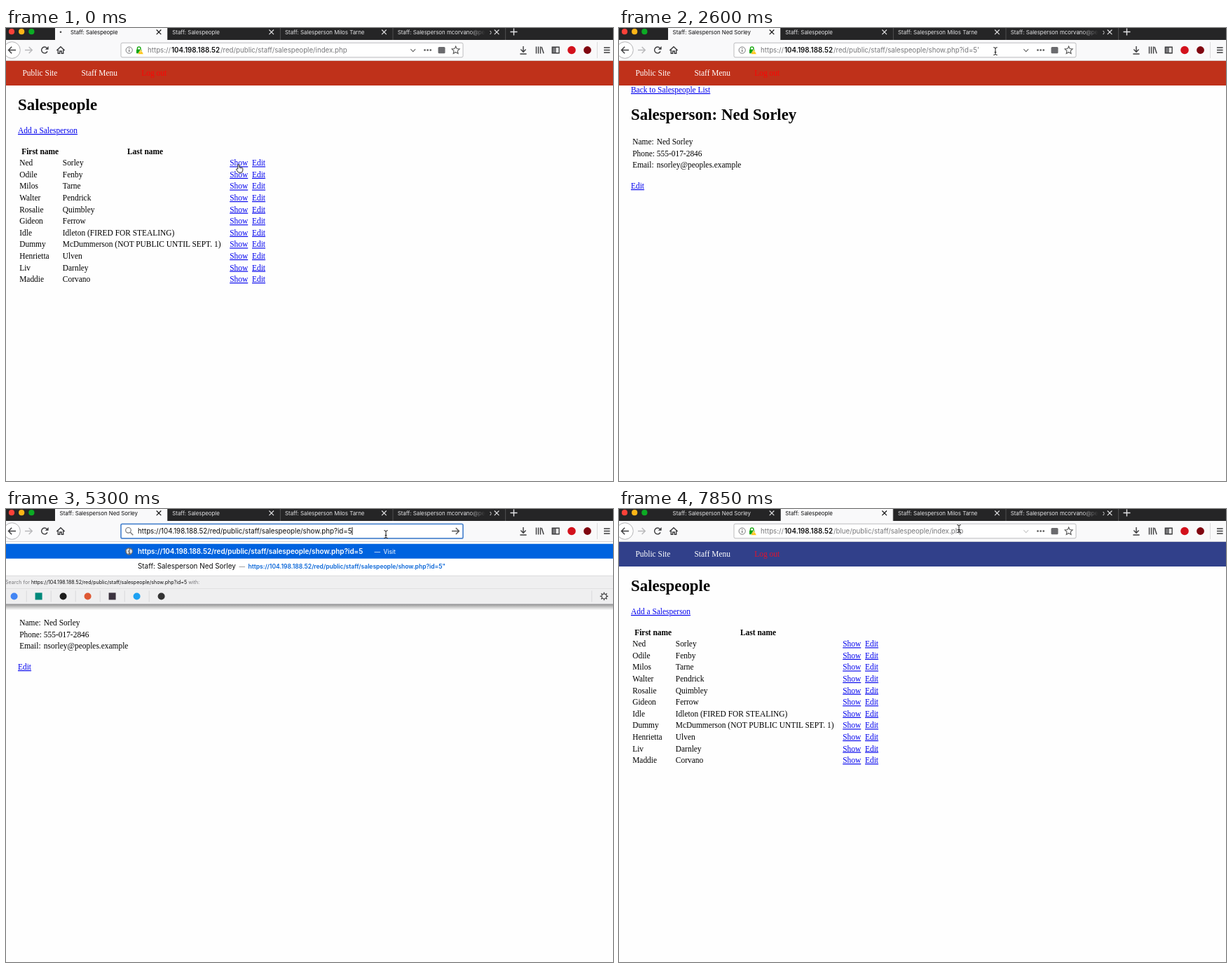
An HTML page for the animation above (8 s loop, 866 by 646 pixels).

```html
<!DOCTYPE html>
<html lang="en">
<head>
<meta charset="utf-8">
<title>Staff: Salespeople</title>
<style>
html, body { margin: 0; width: 100%; height: 100%; overflow: hidden; background: #fff; }
svg { display: block; width: 100%; height: 100%; }
text { white-space: pre; }
.ui { font-family: Inter, "Open Sans", sans-serif; }
.page { font-family: "Liberation Serif", "Noto Serif", serif; font-size: 11.43px; }
.link { fill: #0000ee; text-decoration: underline; }
.b { font-weight: 700; }
.sb { font-weight: 600; }
.line { fill: none; stroke: #3c3c3e; stroke-width: 1.4; }
</style>
</head>
<body>
<svg id="stage" viewBox="0 0 866 646" preserveAspectRatio="none"></svg>
<script>
const stage = document.getElementById('stage');
const LOOP = 8000;
const HOST = '104.198.188.52';
const PERSON = 'Ned Sorley';
const PEOPLE = [
  ['Ned', 'Sorley'], ['Odile', 'Fenby'], ['Milos', 'Tarne'], ['Walter', 'Pendrick'],
  ['Rosalie', 'Quimbley'], ['Gideon', 'Ferrow'], ['Idle', 'Idleton (FIRED FOR STEALING)'],
  ['Dummy', 'McDummerson (NOT PUBLIC UNTIL SEPT. 1)'], ['Henrietta', 'Ulven'],
  ['Liv', 'Darnley'], ['Maddie', 'Corvano']
];
// pointer path: time, x, y
const PATH = [
  [0, 333, 200], [300, 334, 198], [450, 345, 180], [800, 500, 48], [950, 522, 33],
  [1250, 534, 32], [1550, 539, 32], [1700, 537, 33], [2750, 537, 33], [3050, 530, 60],
  [3350, 508, 112], [3500, 508, 112], [3950, 537, 37], [4100, 535, 36], [4400, 541, 35],
  [4850, 544, 35], [5000, 542, 36], [6200, 542, 36], [6650, 299, 22], [6800, 298, 9],
  [7250, 298, 9], [7550, 400, 20], [7850, 485, 28], [LOOP, 485, 28]
];

const within = (t, ...spans) => spans.some(([a, b]) => t >= a && t < b);
const text = (x, y, s, size, fill = '#0c0c0d', more = '') =>
  `<text x="${x}" y="${y}"${size ? ` font-size="${size}"` : ''} fill="${fill}" ${more}>${s}</text>`;
const rect = (x, y, w, h, fill, more = '') =>
  `<rect x="${x}" y="${y}" width="${w}" height="${h}" fill="${fill}" ${more}/>`;
const disc = (x, y, r, fill, more = '') => `<circle cx="${x}" cy="${y}" r="${r}" fill="${fill}" ${more}/>`;
const line = (d, more = '') => `<path class="line" d="${d}" ${more}/>`;
const range = (n, f) => Array.from({ length: n }, (_, i) => f(i)).join('');
const ink = c => `style="stroke:${c}"`;

function stateAt(t) {
  const blue = t >= 6800, list = t < 450 || blue;
  const id = t < 2000 ? '5' : t < 5300 ? "5'" : t < 5450 ? '5' : '5"';
  return {
    blue, list, t,
    busy: within(t, [0, 450], [2450, 2600], [5900, 6050]),
    path: `/${blue ? 'blue' : 'red'}/public/staff/salespeople/${list ? 'index.php' : 'show.php?id=' + id}`,
    focus: within(t, [1100, 2450], [4400, 5900]),
    selected: within(t, [1100, 1550], [4400, 4850]),
    typed: within(t, [2000, 2450], [5300, 5900]),
    reloadOff: within(t, [450, 1100], [3500, 5300], [6050, 6350]),
    rows: t < 3000 ? 10 : t < 5450 ? 2 : 4
  };
}

function tabs(s) {
  const active = s.blue ? 1 : 0, step = 160.7;
  const own = s.list && !s.blue ? 'Staff: Salespeople' : 'Staff: Salesperson ' + PERSON;
  const titles = [own, 'Staff: Salespeople', 'Staff: Salesperson Milos Tarne', 'Staff: Salesperson mcorvano@peop'];
  const lights = ['#fc4138', '#fdb517', '#0cab24'];
  let out = rect(0, 0, 866, 17, '#252526') + rect(70 + active * step, 0, step - .5, 17, '#f9f9fa');
  out += lights.map((c, i) => disc(8 + i * 14.2, 5.2, 4.1, c)).join('');
  titles.forEach((title, i) => {
    const x = 70 + i * step, on = i === active, fill = on ? '#0c0c0d' : '#e4e4e6';
    const busy = i === 0 && s.busy;
    out += text(x + (busy ? 22 : 6.6), 9, title, 7.86, fill);
    if (busy) out += disc(78, 5.8, 1.3, '#444');
    if (i === 3) out += rect(x + 108, 0, 30, 16, 'url(#fade)');
    out += line(`M${x + 144.7} 2.5l6.6 6.6m0-6.6l-6.6 6.6`, `style="stroke:${fill};stroke-width:1.1"`);
    out += rect(x + step - .5, 0, .8, 17, '#59595b');
  });
  return out + line('M724.5 .5v10m-5-5h10', ink('#e4e4e6'));
}

function star(cx, cy) {
  const pts = Array.from({ length: 10 }, (_, i) => {
    const a = -Math.PI / 2 + i * Math.PI / 5, r = i % 2 ? 2.7 : 5.8;
    return (cx + r * Math.cos(a)).toFixed(1) + ' ' + (cy + r * Math.sin(a)).toFixed(1);
  });
  return line('M' + pts.join('L') + 'z', 'style="stroke-width:1.1;stroke:#555"');
}

function toolbar(s) {
  let out = rect(0, 17, 866, 29.5, '#f9f9fa') + rect(0, 46, 866, .6, '#c9c9cb');
  out += disc(8.5, 31.5, 11.8, '#fff', 'stroke="#b4b4b6" stroke-width="1"');
  out += line('M14 31.5H3.5m4.7-4.7l-4.7 4.7l4.7 4.7');
  out += line('M27 31.5h10.3m-4.6-4.6l4.6 4.6l-4.6 4.6', ink('#b9b9bb'));
  const c = s.reloadOff ? '#b9b9bb' : '#3c3c3e';
  out += line('M59 33.4a4.4 4.4 0 1 1-.8-5', ink(c)) + `<path d="M60.6 26v4.8h-4.8z" fill="${c}"/>`;
  out += line('M72.3 32l5.7-5.3l5.7 5.3M74.3 31v5.3h2.4v-3.3h2.6v3.3h2.4v-5.3');
  out += line('M738 26v8m-3.6-3.4l3.6 3.6l3.6-3.6M733.4 37h9.2');
  out += line('M756.5 26.5v10m3-10v10m3-10v10m1.6-9.6l3 9.4');
  out += line('M779.3 27.3h9.8v8.4h-9.8zM784 27.3v8.4') + rect(780, 28, 3.6, 7, '#77777a');
  out += disc(807, 31.5, 5.8, '#d3111c') + disc(829.5, 31.5, 5.4, '#800610');
  out += rect(843, 20, .8, 23, '#d4d4d6') + line('M853 28h8.6m-8.6 3.5h8.6m-8.6 3.5h8.6');
  return out + urlBar(s);
}

function urlBar(s) {
  let out = s.focus
    ? rect(164, 21.3, 488, 20.6, '#fff', 'rx="2" stroke="#4f87cf" stroke-width="1.7"')
    : rect(164, 21.2, 488, 20.6, '#fff', 'rx="2" stroke="#bcbcbe" stroke-width="1"');
  const full = 'https://' + HOST + s.path;
  if (s.typed) {
    out += disc(174.5, 30.3, 3.8, 'none', 'stroke="#77777a" stroke-width="1.2"');
    out += line('M177.3 33.2l4 4', ink('#77777a'));
    out += line('M636 31.5h10.4m-4.6-4.6l4.6 4.6l-4.6 4.6', ink('#555'));
    return out + text(188, 35, full, 9.76, '#0c0c0d', 'id="field"');
  }
  out += disc(175.7, 31.6, 4.6, 'none', 'stroke="#77777a" stroke-width="1"');
  out += rect(175.1, 31, 1.2, 3, '#666') + rect(175.1, 28.8, 1.2, 1.2, '#666');
  out += rect(186, 30.5, 7.5, 5.8, '#12a50c', 'rx=".8"');
  out += line('M187.4 31v-1.8a2.3 2.3 0 0 1 4.6 0v1.8', ink('#12a50c'));
  out += '<path d="M192.2 30.6l4 6.6h-8z" fill="#ffbf00" stroke="#fff" stroke-width=".5"/>' +
    rect(191.8, 32.8, .8, 2.4, '#fff');
  const chevron = s.blue ? (s.t < 7700 ? 0 : .35) : 1;
  out += line('M577.3 30.2l3.4 3.4l3.4-3.4', `opacity="${chevron}" style="stroke:#666;stroke-width:1.1"`);
  out += range(3, i => disc(597.5 + i * 4.1, 31.5, 1.35, '#555'));
  out += rect(616.5, 27, 10, 9.2, '#6a6a6d', 'rx="1.5"') + star(641.6, 31.8);
  if (s.focus) {
    if (s.selected) out += rect(202, 25, 314, 13, '#b3d6fd');
    return out + text(202, 35, full, 9.76, '#0c0c0d', 'id="field"');
  }
  return out + text(202, 35, 'https://', 9.76, '#77777a') +
    text(236, 35, HOST, 9.76, '#0c0c0d', 'class="sb"') + text(306, 35, s.path, 9.7, '#77777a');
}

const link = (x, y, s) => text(x, y, s, 0, '#0000ee', 'class="link"');

function page(s) {
  let out = rect(0, 46.5, 866, 35.5, s.blue ? '#31408a' : '#bf311a');
  out += text(23.5, 68, 'Public Site', 0, '#fff') + text(107.5, 68, 'Staff Menu', 0, '#fff') +
    text(193.3, 68, 'Log out', 0, s.blue ? '#e5102c' : '#fb0606');
  if (!s.list) {
    const rows = [['Name:', PERSON], ['Phone:', '555-017-2846'], ['Email:', 'nsorley@peoples.example']];
    out += link(17, 92, 'Back to Salespeople List');
    out += text(17, 131, 'Salesperson: ' + PERSON, 22.86, '#000', 'class="b"');
    rows.forEach(([k, v], i) => {
      const y = 166 + i * 16.7;
      out += text(19.2, y, k, 0, '#000') + text(53.8, y, v, 0, '#000');
    });
    return out + link(17, 229, 'Edit');
  }
  out += text(17, 117, 'Salespeople', 22.86, '#000', 'class="b"') + link(17, 150, 'Add a Salesperson');
  out += text(22.2, 179.7, 'First name', 0, '#000', 'class="b"') +
    text(173, 179.7, 'Last name', 0, '#000', 'class="b"');
  PEOPLE.forEach(([first, last], i) => {
    const y = 196.3 + i * 16.58;
    out += text(19.2, y, first, 0, '#000') + text(80.8, y, last, 0, '#000') +
      link(319.2, y, 'Show') + link(351, y, 'Edit');
  });
  return out;
}

function globe(y) {
  return disc(175.6, y, 5.4, '#6c6c6f') +
    `<path d="M171.6 ${y - 2}l3-2l1.5 1.4l-2 2.6l1.4 1.6l-1.4 2.6l-2-2zM177 ${y - 3}l2.6 1l.4 3l-2 2.6l-1.6-3z" fill="#dededf"/>`;
}

// one suggestion line: title, dash, address
function hit(y, title, dash, url, more = '', fill = '#0a66d8') {
  return text(188, y + 3.5, title, 9.88) + text(dash, y + 3.3, '—', 8.57, '#77777a') +
    text(dash + 13, y + 3.2, url, 8.53, fill, more);
}

function popup(s) {
  const url = 'https://' + HOST + s.path;
  const base = `https://${HOST}/blue/public/staff/salespeople/show.php?id=5`;
  const rowY = i => 60.5 + i * 21.43;
  const end = 52 + s.rows * 21.43, who = 'Staff: Salesperson ' + PERSON;
  const q = s.rows === 10 ? "'" : '"';
  const own = s.rows === 2 ? url + '"' : url;
  let out = rect(0, 46.5, 866, end - 5.5, '#fff') + rect(0, 46, 866, .6, '#c9c9cb');
  out += rect(0, 49.7, 866, 21, '#0063df') + globe(60.3);
  out += text(188, 64, url, 9.88, '#fff', 'class="sb"');
  const dash = s.path.endsWith('5') ? 525.5 : 528.3;
  out += text(dash, 63.8, '—', 8.57, '#fff') + text(dash + 13, 63.8, 'Visit', 8.57, '#fff');
  for (let i = 1; i < s.rows; i++) {
    const y = rowY(i);
    if (s.rows > 2) out += globe(y);
    if (i === 1) out += hit(y, who, 332.5, own, 'class="sb"');
    else if (i === 2 && s.rows === 10) {
      out += rect(156.5, y - 3.8, 7.6, 5.6, '#9a9a9d', 'rx=".8"') + rect(154.8, y + 2, 11, 1.6, '#9a9a9d');
      out += hit(y, 'Staff: Salesperson Milos Tarne', 339.5, 'Switch to Tab', '', '#00847a');
    } else if (i === 3 || i === 7)
      out += hit(y, HOST, 263.5, `${base}${q} or ${q}1${q}=${q}1${q}; ${i === 3 ? '#' : '--'}`);
    else out += hit(y, who, 332.5, `${base}${q} or ${q}1...`);
  }
  out += rect(0, end, 866, 41, '#efeff0') + rect(0, end, 866, .7, '#d0d0d2') + rect(0, end + 18.3, 866, .7, '#dadadc');
  out += text(-1, end + 12, `Search for <tspan fill="#0c0c0d" class="m">${url}</tspan> with:`, 7.1, '#77777a');
  const iy = end + 29.6;
  const marks = ['#4285f4', '#00897b', '#1c1c1c', '#de5833', '#3b3340', '#1da1f2', '#333333'];
  marks.forEach((c, i) => {
    const x = 11.6 + i * 35;
    out += i % 3 === 1 ? rect(x - 5, iy - 5, 10, 10, c) : disc(x, iy, 5, c);
    if (i < 6) out += rect(x + 17.2, iy - 8, .7, 16, '#d0d0d2');
  });
  out += rect(835.5, iy - 8, .7, 16, '#d0d0d2');
  out += disc(853.3, iy, 3.4, 'none', 'stroke="#555" stroke-width="1.2"');
  out += range(8, i => `<path class="line" d="M857 ${iy}h2" transform="rotate(${i * 45} 853.3 ${iy})"/>`);
  return out + rect(0, end + 40.6, 866, .9, '#8a8a8c') + rect(0, end + 41.4, 866, 8, 'url(#shade)');
}

function pointer(t) {
  const i = PATH.findIndex(p => p[0] > t);
  const [t0, x0, y0] = PATH[i - 1], [t1, x1, y1] = PATH[i];
  const k = (t - t0) / (t1 - t0), x = x0 + (x1 - x0) * k, y = y0 + (y1 - y0) * k;
  let shape;
  if (t < 450)
    shape = '<path d="M-2.2 1v-5.2q0-1.3 1-1.3t1 1.3v2.7l4 .7q1 .3 1 1.5v2.4l-1.3 3h-4.8l-3-4q-.4-1.3.8-1.2z" fill="#fff" stroke="#111" stroke-width=".9"/>' +
      line('M.8-1v2m1.7-1.7v2', 'style="stroke-width:.5"');
  else if (y > 19 && y < 43)
    shape = line('M-2.7-5.3q2.2 0 2.7 1.2q.5-1.2 2.7-1.2M0-4.2v8.6M-2.7 5.5q2.2 0 2.7-1.2q.5 1.2 2.7 1.2M-1.3 1.5h2.6', 'style="stroke:#111;stroke-width:1"');
  else
    shape = '<path d="M0-5v11l2.6-2.4l1.7 3.9l1.8-.8l-1.7-3.7h3.5z" fill="#111" stroke="#fff" stroke-width=".8"/>';
  return `<g transform="translate(${x.toFixed(1)} ${y.toFixed(1)})">${shape}</g>`;
}

const DEFS = `<defs>
  <linearGradient id="fade"><stop stop-color="#252526" stop-opacity="0"/><stop offset=".8" stop-color="#252526"/></linearGradient>
  <linearGradient id="shade" x2="0" y2="1"><stop stop-opacity=".38"/><stop offset="1" stop-opacity="0"/></linearGradient>
</defs>`;

function draw(t) {
  const s = stateAt(t);
  stage.innerHTML = DEFS + rect(0, 0, 866, 646, '#fefefe') +
    `<g class="page">${page(s)}</g><g class="ui">${tabs(s)}${toolbar(s)}${s.typed ? popup(s) : ''}</g>` +
    '<rect id="caret" y="26" width=".9" height="11" visibility="hidden"/>' + pointer(t);
  const field = document.getElementById('field');
  if (field && !s.selected) {
    const caret = document.getElementById('caret');
    caret.setAttribute('x', +field.getAttribute('x') + field.getComputedTextLength());
    caret.setAttribute('visibility', 'visible');
  }
}

const stepTime = t => t < 650 ? Math.min(450, Math.floor(t / 150) * 150) : Math.floor((t - 50) / 150) * 150 + 50;

const start = performance.now();
let shown = -1;
function tick(now) {
  const t = stepTime(Math.max(0, now - start) % LOOP);
  if (t !== shown) draw(shown = t);
  requestAnimationFrame(tick);
}
draw(shown = 0);
requestAnimationFrame(tick);
</script>
</body>
</html>
```
